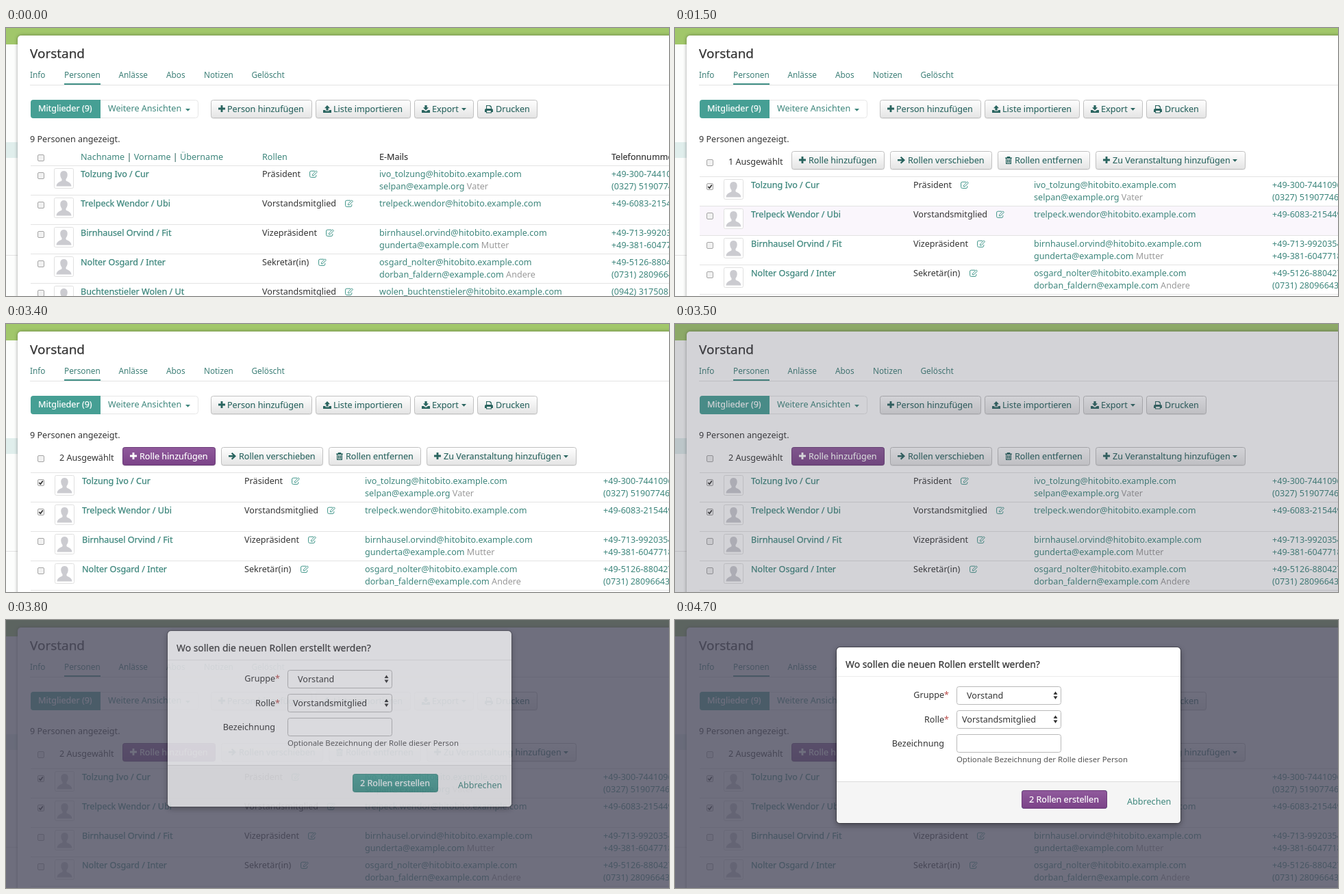
An HTML page that plays this animation: 968x392 px, repeating every 4.8 s.

```html
<!DOCTYPE html>
<html lang="de">
<head>
<meta charset="utf-8">
<title>Rollen hinzufügen</title>
<style>
  html, body { margin: 0; width: 100%; height: 100%; overflow: hidden; background: #fff; }
  svg { display: block; width: 968px; height: 392px; }
  text { font: 12.6px "Noto Sans", "Open Sans", sans-serif; fill: #333; white-space: pre; }
  .link { fill: #3d867c; }
  .name { fill: #3d867c; stroke: #3d867c; stroke-width: .25px; }
  .tab { font-size: 11.8px; fill: #3d7f77; }
  .title { font-size: 18.9px; stroke: #333; stroke-width: .25px; }
  .head { stroke: #333; stroke-width: .15px; }
  .tool { fill: #29645f; stroke: #29645f; stroke-width: .1px; }
  .white { fill: #fff; stroke: #fff; stroke-width: .2px; }
  .mtitle { font-size: 13.9px; stroke: #333; stroke-width: .2px; }
  .help { font-size: 11.34px; fill: #555; }
  .end { text-anchor: end; }
  .soft { fill: #999; }
  .star { fill: #b94a48; }
  .panel { filter: drop-shadow(0 0 2.5px rgba(0, 0, 0, .38)); }
  .frame { filter: drop-shadow(0 3px 4px rgba(0, 0, 0, .4)); }

  .show, .hide, .hover { animation: 4.8s step-end infinite; }
  .list { animation-name: off-list; }
  .bulk { animation-name: on-bulk; }
  .one { animation-name: off-one; }
  .two { animation-name: on-two; }
  .hover1 { animation-name: hover1; }
  .hover2 { animation-name: hover2; }
  .add { animation-name: on-add; }
  .create { animation-name: on-create; }
  .backdrop { animation: backdrop 4.8s linear infinite; }
  .modal { animation: fade 4.8s linear infinite, drop 4.8s linear infinite; }

  @keyframes off-list { 0% { visibility: visible } 16.6%, 100% { visibility: hidden } }
  @keyframes on-bulk { 0% { visibility: hidden } 16.6%, 100% { visibility: visible } }
  @keyframes off-one { 0% { opacity: 1 } 43.7%, 100% { opacity: 0 } }
  @keyframes on-two { 0% { opacity: 0 } 43.7%, 100% { opacity: 1 } }
  @keyframes hover1 { 0% { opacity: 0 } 12.4% { opacity: 1 } 16.6%, 100% { opacity: 0 } }
  @keyframes hover2 { 0% { opacity: 0 } 27% { opacity: 1 } 45.8%, 100% { opacity: 0 } }
  @keyframes on-add { 0% { opacity: 0 } 47.9%, 100% { opacity: 1 } }
  @keyframes on-create { 0% { opacity: 0 } 95.8%, 100% { opacity: 1 } }
  @keyframes backdrop { 0%, 71.875% { opacity: 0 } 75.3%, 100% { opacity: .8 } }
  @keyframes fade { 0%, 75% { opacity: 0 } 80.6%, 100% { opacity: 1 } }
  @keyframes drop {
    0%, 75.15% { transform: translateY(-138px); animation-timing-function: ease-out }
    81.4%, 100% { transform: none }
  }
</style>
</head>
<body>
<svg id="stage" viewBox="0 0 968 392">
  <defs>
    <linearGradient id="grey" x2="0" y2="1"><stop stop-color="#fff"/><stop offset="1" stop-color="#e4e4e4"/></linearGradient>
    <linearGradient id="teal" x2="0" y2="1"><stop stop-color="#4aa398"/><stop offset="1" stop-color="#3f9489"/></linearGradient>
    <linearGradient id="purple" x2="0" y2="1"><stop stop-color="#905a9c"/><stop offset="1" stop-color="#7b4388"/></linearGradient>
    <path id="plus" d="M3.6 0h2.8v3.6H10v2.8H6.4V10H3.6V6.4H0V3.6h3.6z"/>
    <path id="upload" d="M6 0l4 4.2H7.6V7.5H4.4V4.2H2zM0 7h3.4v1.6h5.2V7H12v4H0z"/>
    <path id="download" d="M4.4 0h3.2v3.2H10L6 7.4 2 3.2h2.4zM0 7h3l2 1.8h2L9 7h3v4H0z"/>
    <path id="print" fill-rule="evenodd" d="M2 0h6l2 2v3q2 0 2 2v3h-2v1.5H2V10H0V7q0-2 2-2zM3.1 1.1V5h5.8V2.6H7.4V1.1zM3.1 8v2.4h5.8V8z"/>
    <path id="arrow" d="M5.4 0L11 5.3 5.4 10.6 3.9 9.1 6.3 6.6H0V4H6.3L3.9 1.5z"/>
    <path id="trash" fill-rule="evenodd" d="M3 0h4l.7 1.5H10v1.2H9V11H1V2.7H0V1.5h2.3zM2.2 3v6.8h5.6V3zM3 4h1v5H3zm1.6 0h1v5h-1zm1.6 0h1v5h-1z"/>
    <path id="caret" d="M0 0h7L3.5 3.8z"/>
    <g id="edit" fill="none" stroke="#3d9488">
      <path d="M8 1.2H2.5Q.6 1.2.6 3V8.5Q.6 10.4 2.5 10.4H8Q9.8 10.400 9.8 8.5V7"/>
      <path d="M4.5 7.8V6.100L9.800.9 11.400 2.500 6.200 7.800z"/>
    </g>
    <rect id="box" x=".5" y=".5" width="9" height="9" rx="1.5" fill="#f1f1f1" stroke="#a5a5a5"/>
    <path id="tick" d="M2.3 5l2 2.2L7.8 2.4" fill="none" stroke="#333" stroke-width="1.7"/>
    <g id="avatar">
      <rect x=".5" y=".5" width="28" height="29" rx="2" fill="#fff" stroke="#e0e0e0"/>
      <path fill="#cbcbd0" d="M14.5 4c4 0 5.5 3 5.2 6.5-.2 3-1.5 4.5-2.2 5.5v2c1 2 7.5 2 8 8.5h-22c.5-6.5 7-6.5 8-8.5v-2c-.7-1-2-2.5-2.2-5.5C9 7 10.5 4 14.5 4z"/>
    </g>
  </defs>
</svg>
<script>
  const people = [
    ['Tolzung Ivo / Cur', 'Präsident', 69, 'ivo_tolzung@hitobito.example.com', '+49-300-7441096', 'selpan@example.org', 'Vater', '(0327) 51907746'],
    ['Trelpeck Wendor / Ubi', 'Vorstandsmitglied', 121, 'trelpeck.wendor@hitobito.example.com', '+49-6083-215449'],
    ['Birnhausel Orvind / Fit', 'Vizepräsident', 93, 'birnhausel.orvind@hitobito.example.com', '+49-713-9920354', 'gunderta@example.com', 'Mutter', '+49-381-6047718'],
    ['Nolter Osgard / Inter', 'Sekretär(in)', 82, 'osgard_nolter@hitobito.example.com', '+49-5126-880427', 'dorban_faldern@example.com', 'Andere', '(0731) 28096643'],
    ['Buchtenstieler Wolen / Ut', 'Vorstandsmitglied', 121, 'wolen_buchtenstieler@hitobito.example.com', '(0942) 317508']
  ];

  const text = (x, y, s, cls = '') => `<text x="${x}" y="${y}" class="${cls}">${s}</text>`;
  const span = (s, cls) => `<tspan class="${cls}">${s}</tspan>`;
  const use = (id, x, y, fill = '#29645f') => `<use href="#${id}" x="${x}" y="${y}" fill="${fill}"/>`;
  const rect = (x, y, w, h, fill, more = '') => `<rect x="${x}" y="${y}" width="${w}" height="${h}" fill="${fill}" ${more}/>`;
  const line = (x, y, w, color = '#e3e3e3') => rect(x, y, w, 1, color);
  const group = (cls, s) => `<g class="${cls}">${s}</g>`;

  // Button outline from left to right edge, 27px high
  const shell = (l, r, y, fill, stroke) =>
    rect(l + .5, y + .5, r - l - 1, 26, `url(#${fill})`, `rx="3" stroke="${stroke}"`);

  const button = (l, r, y, icon, label, tx, caret) =>
    rect(l + .5, y + 1.5, r - l - 1, 26, 'none', 'rx="3" stroke="#000" stroke-opacity=".08"') +
    shell(l, r, y, 'grey', '#c0c0c0') + use(icon, l + 11, y + 8) +
    text(tx, y + 17.5, label, 'tool') + (caret ? use('caret', caret, y + 12) : '');

  const row = (p, top, c, checked) => {
    const [name, role, gap, mail, phone, mail2, kind, phone2] = p;
    const y1 = top + 17, y2 = top + 35;
    return line(36, top, 932) + use('box', 46, top + 10) +
      (checked ? group(checked, use('tick', 46, top + 10, 'none')) : '') +
      use('avatar', c.avatar, top + 4) +
      text(c.name, y1, name, 'name') + text(c.role, y1, role) + use('edit', c.role + gap, top + 7) +
      text(c.mail, y1, mail, 'link') + text(c.phone, y1, phone, 'link') +
      (mail2 ? text(c.mail, y2, mail2 + span(' ' + kind, 'soft'), 'link') + text(c.phone, y2, phone2, 'link') : '');
  };

  const rows = (top, cols, checks = []) =>
    people.map((p, i) => row(p, top + 43 * i, cols, checks[i])).join('');

  const page =
    rect(0, 0, 968, 24, '#a1c76a') + rect(0, 24, 17, 368, '#fcfdfc') +
    rect(0, 167, 17, 23, '#e0eeec') + line(0, 332, 17) +
    rect(17, 11, 970, 400, '#fff', 'rx="5" class="panel"') +
    text(35, 44, 'Vorstand', 'title') +
    [['Info', 35], ['Personen', 85], ['Anlässe', 164.5], ['Abos', 234], ['Notizen', 289], ['Gelöscht', 358.5]]
      .map(([s, x]) => text(x, 73, s, 'tab')).join('') +
    line(35, 83, 933) + rect(85, 81, 53, 2, '#3f8f85') +
    rect(130.5, 105.5, 150, 26, '#fff', 'rx="4" stroke="#e6e6e6"') +
    '<path d="M40 105h98v27H40q-4 0-4-4v-19q0-4 4-4z" fill="#469f94"/>' +
    text(47, 122, 'Mitglieder (9)', 'white') +
    text(149, 122, 'Weitere Ansichten', 'link') + use('caret', 262, 118, '#3d867c') +
    button(299, 447, 105, 'plus', 'Person hinzufügen', 323) +
    button(452, 591, 105, 'upload', 'Liste importieren', 478) +
    button(596, 683, 105, 'download', 'Export', 622, 665) +
    button(688, 776, 105, 'print', 'Drucken', 715) +
    text(35, 167, '9 Personen angezeigt.');

  const list =
    group('hover hover1', rect(36, 202, 932, 42, '#faf6fc')) +
    use('box', 46, 185) +
    text(109, 193, 'Nachname' + span(' | ', 'head') + 'Vorname' + span(' | ', 'head') + 'Übername', 'link') +
    text(374, 193, 'Rollen', 'link') + text(545, 193, 'E-Mails', 'head') + text(884, 193, 'Telefonnummern', 'head') +
    rows(201, { avatar: 70, name: 109, role: 374, mail: 545, phone: 884 });

  const bulk =
    group('hover hover2', rect(36, 261, 932, 42, '#faf6fc')) +
    use('box', 46, 192) +
    group('hide one', text(78, 200, '1 Ausgewählt')) + group('show two', text(78, 200, '2 Ausgewählt')) +
    button(170, 306, 180, 'plus', 'Rolle hinzufügen', 195) +
    group('show add', shell(170, 306, 180, 'purple', '#6b3b78') + use('plus', 181, 188, '#fff') +
      text(195, 197.5, 'Rolle hinzufügen', 'white')) +
    button(314, 463, 180, 'arrow', 'Rollen verschieben', 340) +
    button(471, 606, 180, 'trash', 'Rollen entfernen', 496) +
    button(614, 833, 180, 'plus', 'Zu Veranstaltung hinzufügen', 639, 814) +
    rows(217, { avatar: 71, name: 111, role: 348, mail: 524, phone: 872 }, ['checked', 'show two']);

  const field = y => rect(411.5, y + .5, 152, 26, '#fff', 'rx="3" stroke="#b9b9b9"');
  const select = (y, x, s) => field(y) + text(x, y + 17.5, s) +
    `<path d="M552.5 ${y + 12}l3-4.5 3 4.5zm0 2.5h6l-3 4.5z" fill="#333"/>`;
  const label = (y, s) => text(400, y, s + span('*', 'star'), 'end');

  const modal =
    rect(236, 40, 502, 257, '#fff', 'rx="5" class="frame"') +
    '<path d="M236 237h502v55q0 5-5 5H241q-5 0-5-5z" fill="#f5f5f5"/>' +
    rect(235.5, 39.5, 503, 258, 'none', 'rx="5" stroke="#000" stroke-opacity=".3"') +
    text(249, 70, 'Wo sollen die neuen Rollen erstellt werden?', 'mtitle') + line(236, 82, 502, '#ececec') +
    label(114, 'Gruppe') + select(97, 426, 'Vorstand') +
    label(150, 'Rolle') + select(132, 419, 'Vorstandsmitglied') +
    text(393, 185, 'Bezeichnung', 'end') + field(167) +
    text(411, 208, 'Optionale Bezeichnung der Rolle dieser Person', 'help') +
    line(236, 236, 502, '#dcdcdc') +
    shell(506, 631, 249, 'teal', '#3a8a80') +
    group('show create', shell(506, 631, 249, 'purple', '#6b3b78')) +
    text(517, 267, '2 Rollen erstellen', 'white') + text(660, 270, 'Abbrechen', 'link');

  document.getElementById('stage').insertAdjacentHTML('beforeend',
    page + group('hide list', list) + group('show bulk', bulk) +
    rect(0, 0, 968, 392, '#4c4c5e', 'class="backdrop"') + group('modal', modal));
</script>
</body>
</html>
```
